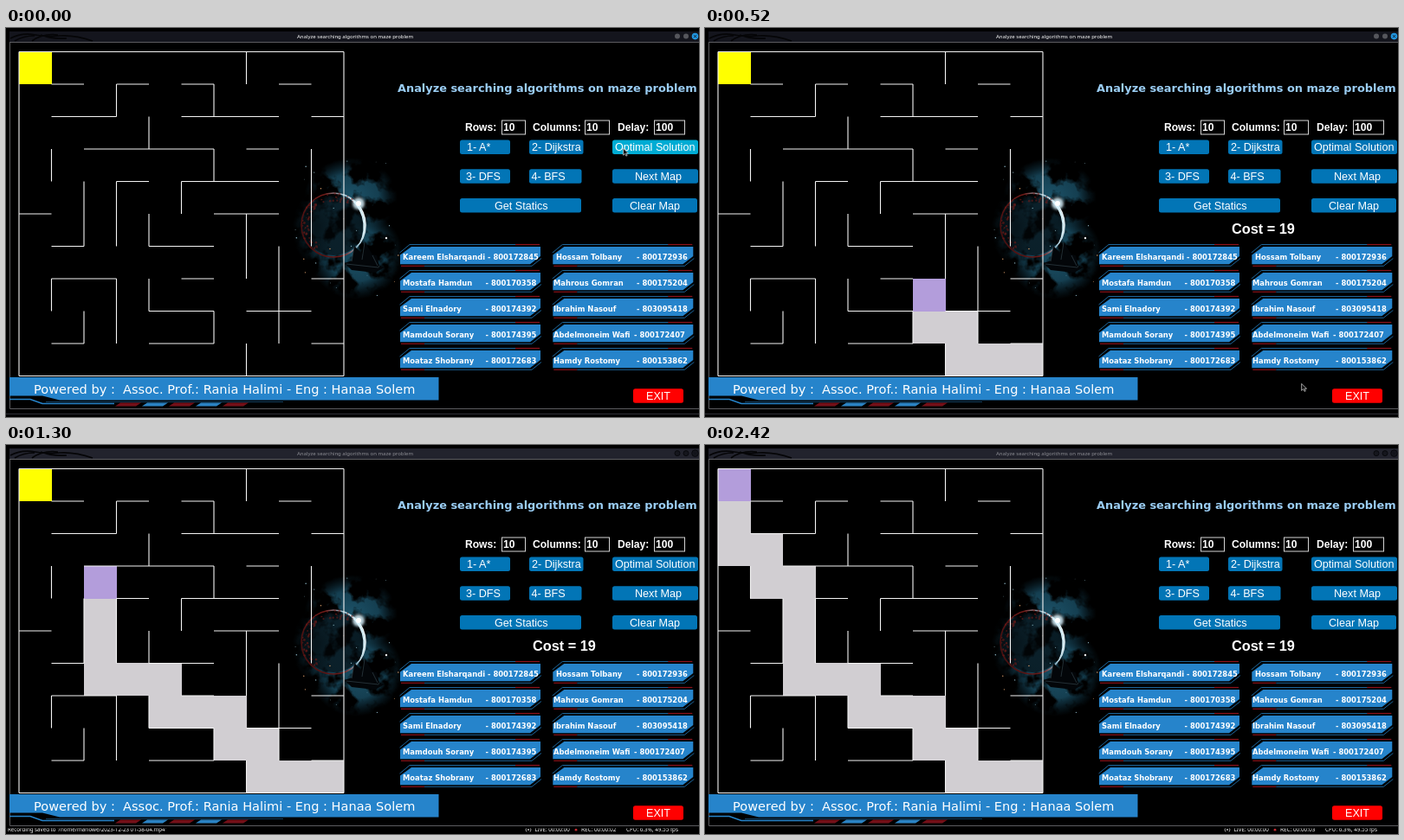
Animation of 800x450 px, one loop 2.45 s. Source, as an HTML page:

```html
<!DOCTYPE html>
<html lang="en">
<head>
<meta charset="utf-8">
<title>Maze search</title>
<style>
html, body { margin: 0; width: 100%; height: 100%; overflow: hidden; background: #000; }
svg { display: block; width: 800px; height: 450px; }
text { white-space: pre; fill: #fff; }
.arial { font-family: "Liberation Sans", Arial, sans-serif; }
.dejavu { font-family: "DejaVu Sans", sans-serif; }
.noto { font-family: "Noto Sans", sans-serif; }
.bold { font-weight: bold; }
.medium { font-weight: 500; }
</style>
</head>
<body>
<svg id="stage" viewBox="0 0 800 450" xmlns="http://www.w3.org/2000/svg">
  <defs>
    <filter id="cloud" x="-20%" y="-20%" width="140%" height="140%" color-interpolation-filters="sRGB">
      <feTurbulence type="fractalNoise" baseFrequency="0.045" numOctaves="4" seed="5"/>
      <feColorMatrix values="0 0 0 0 0  0 0 0 0 0  0 0 0 0 0  5 0 0 0 -1.95" result="noise"/>
      <feComposite in="SourceGraphic" in2="noise" operator="in"/>
    </filter>
    <filter id="glow" x="-100%" y="-100%" width="300%" height="300%"><feGaussianBlur stdDeviation="1.8"/></filter>
    <radialGradient id="haze">
      <stop offset="0" stop-color="#1d5369"/><stop offset="0.6" stop-color="#17465a" stop-opacity=".9"/>
      <stop offset="1" stop-color="#0c2b39" stop-opacity="0"/>
    </radialGradient>
    <linearGradient id="ring" x1="0" y1="0.6" x2="1" y2="0.3">
      <stop offset="0" stop-color="#4a1010"/><stop offset="0.5" stop-color="#6d1a18"/>
      <stop offset="0.75" stop-color="#9fc4d4"/><stop offset="1" stop-color="#fff"/>
    </linearGradient>
  </defs>
  <rect width="800" height="450"/>
  <g id="chrome"></g>
  <g id="art"></g>
  <g id="cells" shape-rendering="crispEdges"></g>
  <path id="walls" fill="none" stroke="#f4f4f4" stroke-width="1.1"/>
  <g id="panel"></g>
  <g id="status"></g>
  <path id="cursor" d="M0 0V8L2 6.3L3.4 9L4.7 8.4L3.4 5.8H6Z" fill="#111" stroke="#ddd" stroke-width=".7"/>
</svg>
<script>
const LOOP = 2450, SIZE = 37.5, LEFT = 15, TOP = 27.5;
const BLUE = '#0275b6', HOVER = '#00acd4', PLATE = '#2684cb';
const $ = id => document.getElementById(id);

function add(parent, tag, attrs, content) {
  const el = document.createElementNS('http://www.w3.org/2000/svg', tag);
  for (const k in attrs) el.setAttribute(k, attrs[k]);
  if (content !== undefined) el.textContent = content;
  parent.appendChild(el);
  return el;
}
const rect = (p, x, y, width, height, fill, more) => add(p, 'rect', { x, y, width, height, fill, ...more });
const path = (p, d, fill, stroke, w = 1) =>
  add(p, 'path', { d, fill: fill || 'none', stroke: stroke || 'none', 'stroke-width': w });
const disc = (p, cx, cy, r, fill, more) => add(p, 'circle', { cx, cy, r, fill, ...more });
const text = (p, x, y, size, font, s, more) =>
  add(p, 'text', { x, y, 'font-size': size, class: font, ...more }, s);
const show = (el, on) => el.setAttribute('visibility', on ? 'visible' : 'hidden');

let seed = 11;
const rnd = () => (seed = seed * 16807 % 2147483647) / 2147483647;

// window frame and title bar
const chrome = $('chrome');
const bar = rect(chrome, 4, 4, 796, 12, '#14151d');
path(chrome, 'M5 12Q18 5 34 8T62 9Q80 8 100 15M30 15Q42 6 60 8M40 8Q52 13 70 12M10 15Q20 9 33 9', null, '#050507', 1.6);
path(chrome, 'M4.5 16.5H800M4.5 16V440.5H800', null, '#5c5c60');
const caption = text(chrome, 336, 12, 6, 'noto medium', 'Analyze searching algorithms on maze problem');
const dots = [775, 785].map(x => disc(chrome, x, 9.6, 3, '#55565c'));
dots.push(disc(chrome, 795.5, 9.6, 3.8, '#2196e0'));
path(chrome, 'M794 8.1L797 11.1M797 8.1L794 11.1', null, '#101218', .9);

// nebula with an eclipse and a ship
const art = $('art');
const cloud = add(art, 'g', { filter: 'url(#cloud)' });
add(cloud, 'ellipse', { cx: 398, cy: 196, rx: 54, ry: 46, fill: 'url(#haze)' });
add(cloud, 'ellipse', { cx: 404, cy: 262, rx: 54, ry: 52, fill: 'url(#haze)' });
add(cloud, 'ellipse', { cx: 372, cy: 232, rx: 42, ry: 50, fill: 'url(#haze)', opacity: .6 });
disc(art, 378, 228, 35, '#02070b', { opacity: .6 });
disc(art, 378, 228, 37, 'none', { stroke: 'url(#ring)', 'stroke-width': 1.6 });
path(art, 'M392 194A37 37 0 0 1 408 249A42 42 0 0 0 392 194Z', '#d4edf5');
for (let i = 0; i < 70; i++) {
  const a = 2.2 + rnd() * 3.2, r = 28 + rnd() * 9;
  disc(art, 378 + Math.cos(a) * r, 228 + Math.sin(a) * r, .5 + rnd(), '#6c1a18', { opacity: .6 });
}
disc(art, 407, 203, 7, '#d9f4ff', { filter: 'url(#glow)', opacity: .85 });
disc(art, 407, 203, 3, '#fff');
path(art, 'M391 272L399 269L402 252L412 262L414 247L423 262L428 263L431 275L437 277L426 283L399 280Z', '#030609');
path(art, 'M399 270L402 253M411 268L414 248M393 273L430 277M423 263L429 275', null, '#3a4c55', .6);
for (let i = 0; i < 26; i++)
  disc(art, 332 + rnd() * 122, 154 + rnd() * 158, .3 + rnd() * .5, i % 4 ? '#8fb9c6' : '#d69a68');
disc(art, 439, 243, 1.2, '#fff');

// maze: each wall is "line:from-to"
const spans = s => s.split(' ').map(v => v.split(/[:-]/).map(Number));
const px = i => LEFT + i * SIZE, py = j => TOP + j * SIZE;
const across = spans('0:0-10 1:1-2 1:3-4 1:5-6 1:8-9 2:1-3 2:5-8 2:9-10 3:2-6 3:7-8 4:3-4 4:5-8 5:0-1 5:6-8 6:1-2 6:4-6 7:1-3 7:5-6 7:9-10 8:4-6 8:7-9 9:1-2 9:4-6 9:9-10 10:0-10');
const down = spans('0:0-10 7:0-1 3:1-2 6:1-2 4:2-3 1:3-4 6:3-4 9:3-6 2:4-6 3:4-6 5:4-5 4:5-6 7:5-7 8:6-9 1:7-8 3:7-9 4:7-8 2:8-9 6:8-9 7:9-10 10:0-10');
$('walls').setAttribute('d',
  across.map(([j, a, b]) => `M${px(a)} ${py(j)}H${px(b)}`).join('') +
  down.map(([i, a, b]) => `M${px(i)} ${py(a)}V${py(b)}`).join(''));

// route from the far corner back to the goal
const route = [[9, 9]];
for (const step of 'LLULULLULLUUULULUU') {
  const [x, y] = route[route.length - 1];
  route.push(step === 'L' ? [x - 1, y] : [x, y - 1]);
}
const cells = $('cells');
const tile = (x, y, fill) =>
  rect(cells, Math.floor(px(x)), Math.floor(py(y)), 38, 38, fill);
tile(0, 0, '#ffff00');
const tiles = route.map(([x, y]) => tile(x, y, '#d1ced2'));

// controls
const panel = $('panel');
text(panel, 452, 73.5, 12.9, 'dejavu bold', 'Analyze searching algorithms on maze problem', { style: 'fill:#9acdf4' });
[['Rows:', 530, 572, 28, '10'], ['Columns:', 608, 668, 29, '10'], ['Delay:', 706, 748, 36, '100']].forEach(([label, x, bx, w, v]) => {
  text(panel, x, 118.7, 12.1, 'arial bold', label);
  rect(panel, bx + .5, 107, w - 1, 16, '#000', { stroke: '#d4d4d4' });
  text(panel, bx + 2, 119, 12.1, 'arial bold', v);
});
function button(x, y, w, tx, label, fill = BLUE) {
  const box = rect(panel, x, y, w, 16.5, fill, { rx: 2.5 });
  text(panel, tx, y + 12.8, 12.6, 'arial', label);
  return box;
}
button(524, 129.5, 58, 532, '1- A*');
button(604, 129.5, 62.5, 607, '2- Dijkstra');
const optimal = button(700, 129.5, 99, 703, 'Optimal Solution');
button(524, 163.2, 58, 531, '3- DFS');
button(604, 163.2, 60.5, 606.5, '4- BFS');
const next = button(700, 163.2, 99, 726, 'Next Map');
button(524, 197, 140, 564, 'Get Statics');
button(700, 197, 98, 720, 'Clear Map');
button(724, 417.2, 58, 739, 'EXIT', '#ff0000');
const cost = text(panel, 608, 238.3, 16.3, 'arial bold', 'Cost = 19');

// name plates
const people = [
  ['Kareem Elsharqandi', '800172845', 458, 556], ['Hossam Tolbany', '800172936', 635, 728],
  ['Mostafa Hamdun', '800170358', 458, 553.5], ['Mahrous Gomran', '800175204', 632, 728],
  ['Sami Elnadory', '800174392', 458, 553.5], ['Ibrahim Nasouf', '803095418', 632, 728],
  ['Mamdouh Sorany', '800174395', 458, 553.5], ['Abdelmoneim Wafi', '800172407', 632, 725],
  ['Moataz Shobrany', '800172683', 458, 553.5], ['Hamdy Rostomy', '800153862', 632, 728]
];
people.forEach(([name, id, x, ix], i) => {
  const g = add(panel, 'g', { transform: `translate(${i % 2 * 176.3} ${(i >> 1) * 30})` });
  path(g, 'M455 262.5L468 253H617V264L605 273.2H455Z', PLATE);
  path(g, 'M454.5 260L466 250.5H589', null, '#1d6599');
  path(g, 'M588 250.5H616', null, '#8d1118', 1.2);
  path(g, 'M456 275.3H483', null, '#8d1118', 1.2);
  path(g, 'M483 275.3H607L618 266.5', null, '#1d6599');
  const y = 267.7 + (i >> 1) * 30;
  text(panel, x, y, 8.4, 'dejavu bold', name);
  text(panel, ix, y, 8.4, 'dejavu bold', '- ' + id);
});

// footer banner
path(panel, 'M4 404H499.5V430.5H62L42 425.5H4Z', PLATE);
path(panel, 'M4 429.5H28L42 434.5H125', null, PLATE, 1.6);
path(panel, 'M46 432.5H320', null, '#174f78', .8);
for (let i = 0; i < 5; i++) {
  const x = 126 + i * 31;
  path(panel, `M${x} 437.5L${x + 6} 433.5H${x + 30}L${x + 24} 437.5Z`, i % 2 ? '#2b83c4' : '#741019');
}
text(panel, 32, 422.5, 14.55, 'dejavu', 'Powered by :  Assoc. Prof.: Rania Halimi - Eng : Hanaa Solem');

// recorder status strip
const status = $('status');
const edge = path(status, 'M0 446.5H800', null, '#303138');
const saved = text(status, 2, 447.4, 6.2, 'noto', "Recording saved to '/home/marlowe/2023-12-23 01-58-04.mp4'");
const live = add(status, 'g', {});
path(live, 'M601 442.5Q599 445 601 447.5M605 442.5Q607 445 605 447.5', null, '#ccc', .8);
disc(live, 603, 445, .9, '#ccc');
text(live, 610.5, 447.4, 6.2, 'noto', 'LIVE: 00:00:00');
disc(live, 658, 445.2, 1.4, '#c22a30');
const rec = text(live, 664, 447.4, 6.4, 'noto', '');
text(live, 716, 447.4, 6.3, 'noto', 'CPU: 6.3%, 49.55 fps');
rect(status, 0, 441, 800, 2.5, '#000');

function draw(t) {
  const head = t < 30 ? -1 : Math.min(18, Math.floor((t + 75) / 100));
  tiles.forEach((el, i) => {
    show(el, i <= head);
    el.setAttribute('fill', i === head ? '#b39ddb' : '#d1ced2');
  });
  show(cost, t >= 30);

  const u = Math.min(1, t / 330), v = Math.max(0, (t - 330) / 220);
  const cx = 712.5 - 6.5 * u - 20 * v, cy = 139 + 38 * u + 270 * v;
  $('cursor').setAttribute('transform', `translate(${cx} ${cy})`);
  show($('cursor'), t < 550);
  const over = y => cx >= 700 && cy >= y && cy <= y + 16.5;
  optimal.setAttribute('fill', over(129.5) ? HOVER : BLUE);
  next.setAttribute('fill', over(163.2) ? HOVER : BLUE);

  const away = t >= 580;
  bar.setAttribute('fill', away ? '#22232d' : '#14151d');
  caption.style.fill = away ? '#8d8e94' : '#fff';
  dots.forEach((d, i) => {
    d.setAttribute('fill', away ? '#15161d' : i === 2 ? '#2196e0' : '#55565c');
    d.setAttribute('stroke', away ? '#08090d' : 'none');
  });
  show(edge, !away);
  show(saved, away && t < 2300);
  show(live, away);
  rec.textContent = 'REC: 00:00:0' + (t < 850 ? 1 : t < 1850 ? 2 : 3);
}

const start = performance.now();
function tick() {
  draw((performance.now() - start) % LOOP);
  requestAnimationFrame(tick);
}
draw(0);
requestAnimationFrame(tick);
</script>
</body>
</html>
```
